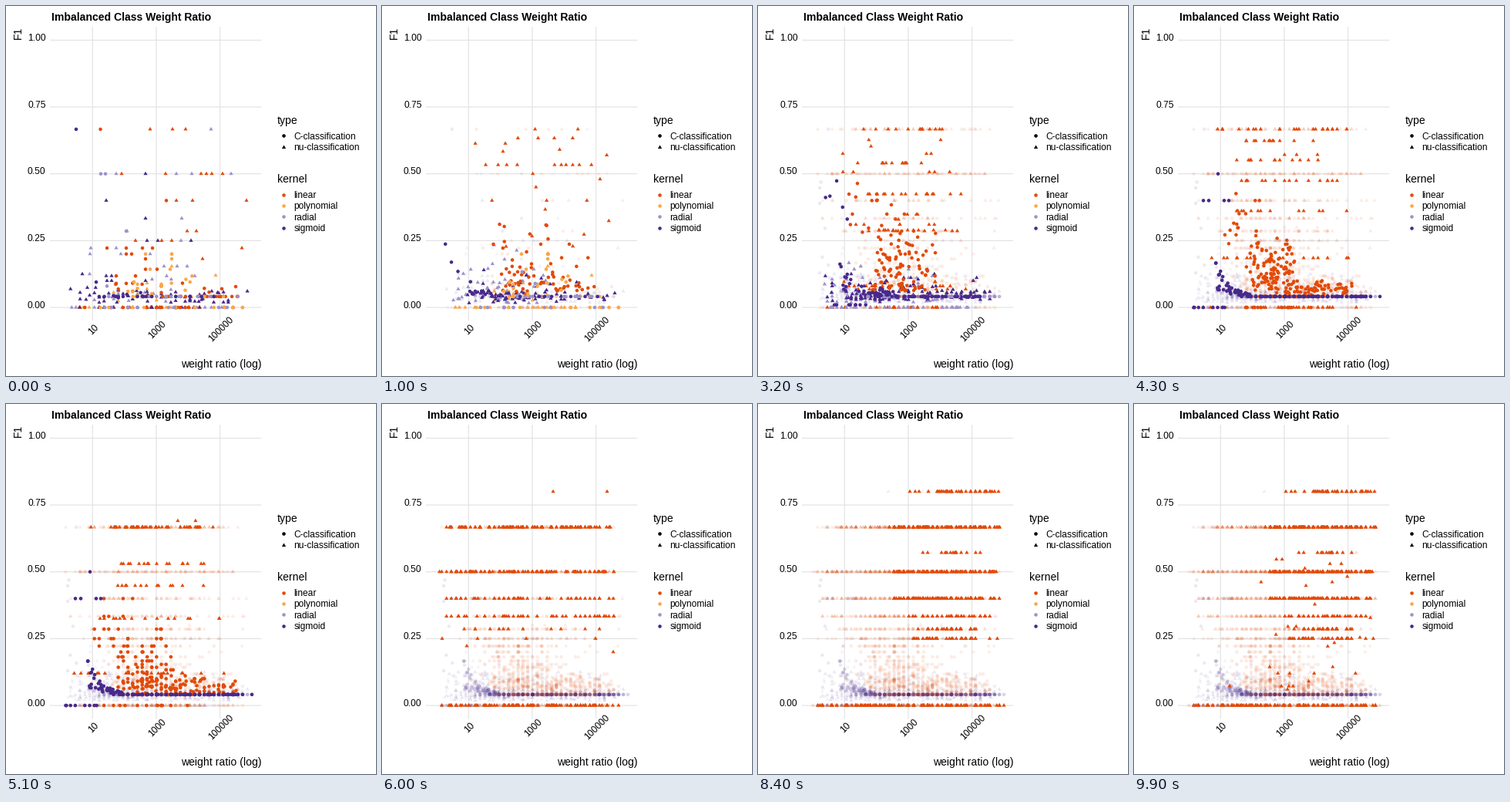
Recreate the animation shown at these times as a matplotlib script. Size 480 by 480 pixels, loop 10 s.

```python
import numpy as np
import matplotlib.pyplot as plt
from matplotlib.animation import FuncAnimation
from matplotlib.colors import to_rgba

SIZE, DPI, FRAMES = 480, 72, 100
FONT = "Liberation Sans"
COLORS = {"l": "#E24A08", "p": "#FBA748", "r": "#9C93C9", "s": "#47298B"}
NAMES = {"l": "linear", "p": "polynomial", "r": "radial", "s": "sigmoid"}
TRIANGLE = [(0, 1.5546), (-1.3468, -0.7773), (1.3468, -0.7773), (0, 1.5546)]
SHADOW = 0.1
BASE = 0.041  # score of a model that always predicts one class

rng = np.random.default_rng(12)


def y_px(v):
    return 391.1 - 346.8 * np.asarray(v)


def xs(n, lo, hi):
    """Pixel positions, partly on the regular log grid of weight ratios."""
    x = lo + (hi - lo) * rng.beta(1.25, 1.35, n)
    grid = 71.3 + 6.2 * np.round((x - 71.3) / 6.2)
    return np.where(rng.random(n) < 0.6, np.clip(grid, 71.3, 319), x)


def row(n, v, lo=76, hi=313):
    return np.column_stack([xs(n, lo, hi), np.full(n, v)])


def cloud(n, lo, hi, low, high):
    """Scores of the form 2/m, denser towards small values."""
    v = np.exp(rng.uniform(np.log(low), np.log(high), n))
    return np.column_stack([xs(n, lo, hi), 2 / np.round(2 / v)])


def decay(n, lo, hi, high):
    """Scores that fall from high towards the base level."""
    u = np.sort(rng.random(n))
    v = BASE + (high - BASE) * np.exp(-3 * u) * rng.uniform(.2, 1, n)
    return np.column_stack([lo + (hi - lo) * u, v])


def spots(levels):
    return np.array([(x, v) for v, px in levels.items() for x in px], float)


def join(*parts):
    return np.vstack(parts)


def mix_head(pts, n=34):
    """Move a random sample to the front, so it pairs with anything."""
    pick = rng.permutation(len(pts))[:n]
    return join(pts[pick], np.delete(pts, pick, axis=0))


def shuffled(pts):
    return pts[rng.permutation(len(pts))]


first = {
    "lt": shuffled(join(spots({
        2/3: [187, 216, 233], .5: [150, 207, 253, 260, 267, 281],
        .4: [221, 242, 312], 2/7: [235, 247], .25: [168, 202, 215],
        2/9: [306], 2/11: [255]}), row(14, 0))),
    "lc": join(spots({
        2/3: [122.5], .4: [208], 2/9: [131, 156, 177, 190],
        .2: [156, 163], 2/11: [181], .143: [181, 196], .118: [143, 168],
        .09: [143, 156], .078: [298], .07: [280]}),
        cloud(10, 140, 270, .05, .1), row(26, BASE, 135, 319),
        row(16, 0, 100, 319)),
    "pt": join(spots({.2: [215], .154: [215], .12: [272]}),
               cloud(10, 90, 300, .02, .1), row(24, 0, 78, 310)),
    "pc": join(spots({.2: [181, 215], 2/11: [215], .143: [187, 213]}),
               cloud(14, 150, 250, .05, .12), row(12, BASE, 150, 310),
               row(14, 0, 90, 319)),
    "rt": join(spots({
        2/3: [266], .5: [143, 221, 241, 292], 1/3: [228], 2/7: [157],
        .25: [227], 2/9: [110, 143], .2: [109, 149, 187],
        .154: [205, 222, 235]}),
        cloud(18, 100, 290, .02, .13), row(14, 0)),
    "rc": join(spots({.5: [123, 129], 2/7: [156], .08: [131]}),
               row(20, BASE, 130, 319), row(10, 0, 85, 300)),
    "st": join(spots({
        .5: [181], .4: [130], 1/3: [181], .25: [183, 197, 240],
        .125: [99], .118: [130, 137], .1: [131, 137, 181]}),
        cloud(56, 76, 315, .018, .075), row(14, 0, 80, 300)),
    "sc": join(spots({2/3: [91], .095: [117]}),
               cloud(6, 90, 200, .02, .07), row(15, BASE, 110, 319)),
}

second = {
    "lt": mix_head(join(row(26, 2/3), row(38, .5), row(12, .4),
                        row(16, 1/3), row(8, 2/7), row(24, 0),
                        cloud(8, 130, 280, .18, .26)), 14),
    "lc": join(cloud(85, 125, 280, .06, .33), row(30, BASE, 140, 318)),
    "rt": join(cloud(60, 80, 220, .018, .18), row(34, 0, 76, 290)),
    "rc": row(24, BASE, 140, 310),
    "st": join(cloud(65, 100, 310, .028, .06), cloud(40, 80, 290, .02, .13)),
    "sc": join(decay(16, 76, 140, .35), row(80, BASE, 125, 318)),
}

third = {
    "lt": mix_head(join(row(26, 2/3), row(38, .5), row(12, .4),
                        row(16, 1/3), row(8, 2/7), row(24, 0)), 14),
    "lc": join(cloud(8, 71, 130, .38, .66), cloud(50, 115, 235, .07, .4),
               cloud(30, 200, 314, .045, .12), row(22, BASE, 150, 318)),
    "rt": join(cloud(46, 84, 240, .018, .17), row(36, 0, 76, 290)),
    "rc": row(20, BASE, 140, 310),
    "st": join(cloud(65, 110, 310, .028, .06), cloud(50, 80, 290, .02, .13)),
    "sc": join(decay(16, 76, 140, .6), row(90, BASE, 125, 318)),
}

fourth = {
    "lt": join(row(24, 2/3, 100, 310), row(12, .5, 140, 245),
               row(12, 2/9, 128, 258), row(3, .3, 195, 240),
               row(16, .4, 118, 272), row(13, .25, 122, 288),
               row(15, 0, 100, 290), row(24, 0, 71, 300)),
    "lc": join(cloud(14, 112, 180, .26, .5), cloud(105, 140, 220, .06, .34),
               cloud(75, 165, 300, .045, .12), row(50, BASE, 145, 280),
               row(12, 0, 115, 240)),
    "sc": join(spots({.5: [109], .4: [90, 97, 117, 123]}),
               decay(44, 102, 152, .22), row(8, 0, 71, 120),
               row(105, BASE, 135, 318)),
}

# Only the scores change here.
fifth = {k: p.copy() for k, p in fourth.items()}
fifth["lt"][:, 1] = np.repeat([2/3, .5, .4, .25, 0], [51, 16, 13, 15, 24])
fifth["lc"] = join(cloud(14, 112, 180, .22, .42),
                   cloud(105, 140, 220, .06, .32),
                   cloud(75, 165, 300, .045, .11),
                   row(50, BASE, 145, 280), row(12, 0, 115, 240))

sixth = {"lt": join(
    spots({.8: [222, 292]}), row(112, 2/3, 80, 302), row(112, .5, 70, 312),
    row(46, .4, 76, 314), row(48, 1/3, 78, 308), row(12, 2/7, 84, 300),
    spots({.25: [78, 124, 187, 277], 2/9: [110], .2: [300]}),
    row(100, 0, 70, 316))}

seventh = {"lt": join(
    spots({.8: [169, 208, 213, 221, 273, 294]}), row(112, 2/3, 95, 302),
    row(125, .5, 70, 312), row(85, .4, 76, 316), row(70, 1/3, 92, 304),
    row(22, 2/7, 84, 300), row(14, .25, 76, 302),
    spots({2/9: [111, 215, 268, 299]}), row(105, 0, 70, 318))}

eighth = {"lt": mix_head(join(
    spots({.8: [197, 204, 209, 221, 312]}), row(42, .8, 228, 308),
    row(105, 2/3, 172, 318), row(14, 4/7, 208, 292),
    row(105, .5, 172, 318), row(105, .4, 176, 316),
    row(34, 1/3, 194, 308), row(30, 2/7, 204, 292),
    row(34, .25, 194, 313), row(110, 0, 76, 319)))}

STATES = [first, second, third, fourth, fifth, sixth, seventh, eighth, eighth]
EMPTY = np.empty((0, 2))
KEYS = [k + s for k in COLORS for s in "tc"]


def tween(a, b, t):
    """Paired points move; the others wait for the end of the step."""
    moved = {}
    for key in KEYS:
        p, q = a.get(key, EMPTY), b.get(key, EMPTY)
        n = min(len(p), len(q))
        moved[key] = join(p[:n] + (q[:n] - p[:n]) * t, p[n:])
    return moved


def layer(groups_list, shape, alpha):
    pts, cols = [EMPTY], [np.empty((0, 4))]
    for groups in groups_list:
        for kernel, color in COLORS.items():
            p = groups.get(kernel + shape, EMPTY)
            pts.append(np.column_stack([p[:, 0], y_px(p[:, 1])]))
            cols.append(np.tile(to_rgba(color, alpha), (len(p), 1)))
    return join(*pts), join(*cols)


fig = plt.figure(figsize=(SIZE / DPI, SIZE / DPI), dpi=DPI, facecolor="white")
ax = fig.add_axes([0, 0, 1, 1])
ax.set(xlim=(0, SIZE), ylim=(SIZE, 0))
ax.axis("off")


def dots(shape, z, x=(), y=(), color=None):
    marker, s = (TRIANGLE, 36.8) if shape == "t" else ("o", 20.5)
    return ax.scatter(x, y, s=s, marker=marker, c=color,
                      linewidths=0, zorder=z)


def text(x, y, label, size=12, **kw):
    kw = {"va": "baseline", **kw}
    ax.text(x, y, label, fontsize=size, family=FONT, color="black", **kw)


grid = dict(color="#E1E1E1", lw=1.1, zorder=0, solid_capstyle="butt",
            snap=False)
for v in (0, .25, .5, .75, 1):
    ax.plot([57, 331.3], [y_px(v)] * 2, **grid)
    text(51.6, y_px(v) + .5, f"{v:.2f}", ha="right")
for e in (1, 3, 5):
    x = 70.9 + 41.35 * e
    ax.plot([x, x], [27, 408.4], **grid)
    text(x + 2, 420, str(10 ** e), rotation=45, ha="center", va="center")

text(58.7, 19, "Imbalanced Class Weight Ratio", 14, weight="bold")
text(331.3, 469, "weight ratio (log)", 14, ha="right")
text(20.3, 43.3, "F1", 14, rotation=90, rotation_mode="anchor")

text(352, 152.5, "type", 14)
for i, (shape, label) in enumerate([("c", "C-classification"),
                                    ("t", "nu-classification")]):
    y = 168.3 + 14.4 * i
    dots(shape, 3, [359.6], [y], "black")
    text(373.6, y + 4.4, label)

text(352, 229, "kernel", 14)
for i, kernel in enumerate(COLORS):
    y = 244.6 + 14.4 * i
    dots("c", 3, [359.6], [y], COLORS[kernel])
    text(373.6, y + 4.4, NAMES[kernel])

shadows = {s: dots(s, 1) for s in "tc"}
live = {s: dots(s, 2) for s in "tc"}


def show(artists, groups_list, alpha):
    for shape, art in artists.items():
        pts, cols = layer(groups_list, shape, alpha)
        art.set_offsets(pts)
        art.set_facecolors(cols)


def update(frame):
    k, part = divmod(frame * len(STATES) / FRAMES, 1)
    k = int(k)
    t = max(0, 2 * part - 1)  # hold, then move on
    past = STATES[:k + 1] if t > 0 else STATES[:k]
    show(shadows, past, SHADOW)
    show(live, [tween(STATES[k], STATES[(k + 1) % len(STATES)], t)], 1)
    return [*shadows.values(), *live.values()]


anim = FuncAnimation(fig, update, frames=FRAMES, interval=100,
                     repeat=True, repeat_delay=0, blit=False)
plt.show()
```
